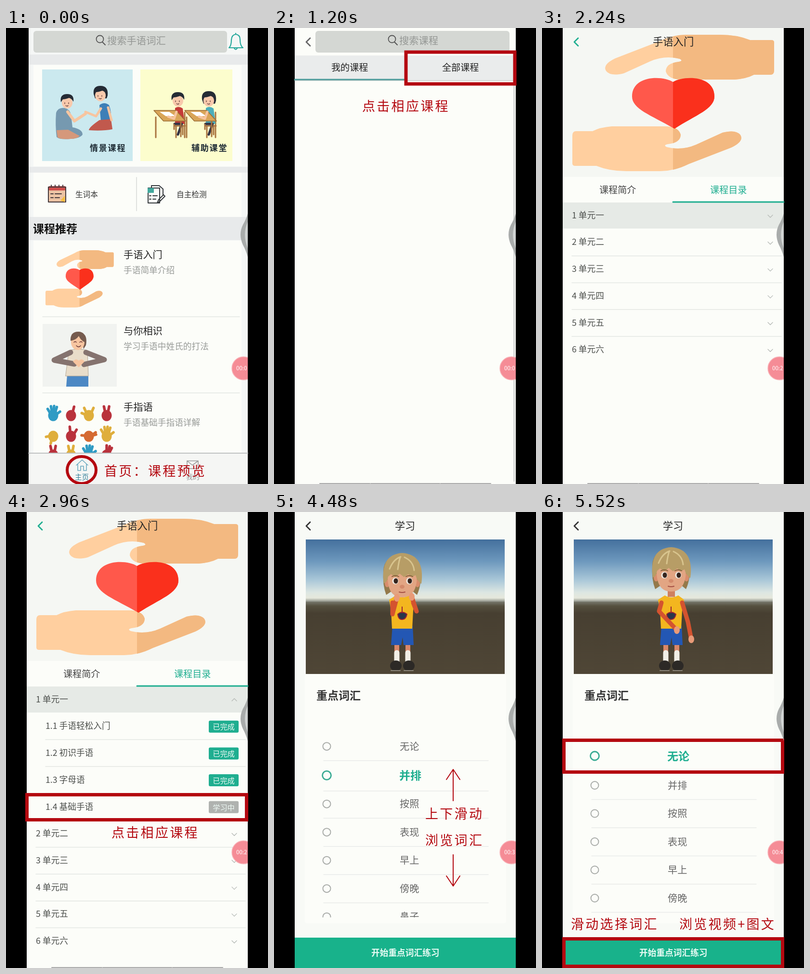
Write an HTML page with a canvas that moves like this. It is 544 px wide and 946 px high and loops after 5600 ms.

```html
<!DOCTYPE html>
<html lang="zh-CN">
<head>
<meta charset="utf-8">
<style>
html,body{margin:0;width:100%;height:100%;overflow:hidden;background:#000}
canvas{display:block}
</style>
</head>
<body>
<canvas id="stage" width="544" height="946"></canvas>
<script>
const c = document.getElementById('stage').getContext('2d');
const LOOP = 5600, STEP = 80;
const RED = '#b40810', TEAL = '#1fae90', PAGE = '#fcfdf9', NAVY = '#1f4257', SKIN = '#f7c5a0';

// ---- helpers ----
function rect(x, y, w, h, fill, r = 0) {
  c.fillStyle = fill;
  c.beginPath();
  c.roundRect(x, y, w, h, r);
  c.fill();
}
function path(d, fill, stroke, width = 2) {
  const p = new Path2D(d);
  if (fill) { c.fillStyle = fill; c.fill(p); }
  if (stroke) { c.strokeStyle = stroke; c.lineWidth = width; c.stroke(p); }
}
function oval(x, y, rx, ry, fill, stroke, width = 2) {
  c.beginPath();
  c.ellipse(x, y, rx, ry, 0, 0, 7);
  if (fill) { c.fillStyle = fill; c.fill(); }
  if (stroke) { c.strokeStyle = stroke; c.lineWidth = width; c.stroke(); }
}
function text(s, x, y, size, color, weight = 400, gap = 0, align = 'left') {
  c.font = `${weight} ${size}px "Noto Sans CJK SC","Noto Sans CJK",sans-serif`;
  c.letterSpacing = gap + 'px';
  c.textAlign = align;
  c.fillStyle = color;
  c.fillText(s, x, y);
}
const caption = (s, x, y) => text(s, x, y, 27, RED, 400, 3.3);
const hline = (x1, x2, y, color = '#e4e7e4', w = 1.5) => path(`M${x1} ${y}H${x2}`, null, color, w);
function box(x, y, w, h) {
  c.lineJoin = 'miter';
  c.strokeStyle = RED;
  c.lineWidth = 7;
  c.strokeRect(x, y, w, h);
  c.lineJoin = 'round';
}
function back(color) { path('M75 21L67 29L75 37', null, color, 2.8); }
function at(x, y, sx, sy, draw) {
  c.save();
  c.translate(x, y);
  c.scale(sx, sy);
  draw();
  c.restore();
}
function search(x, w, label, labelX) {
  rect(x, 6, w, 45, '#d4d7d3', 6);
  oval(labelX - 15, 23, 7.5, 7.5, null, '#555', 1.8);
  path(`M${labelX - 10} 29l6 6`, null, '#555', 2);
  text(label, labelX, 26, 20.3, '#949794');
}
const navMarks = () => [[95, 199], [201, 344], [346, 450]].forEach(([a, b]) => hline(a, b, 945, '#aaa', 2));

// ---- drawings ----
const palm = new Path2D('M482 30Q482 25 476 25H432Q405 14 370 14H300Q270 14 240 29L152 63Q125 76 133 89Q142 101 170 94L225 69Q255 56 286 64Q294 68 284 70Q257 73 257 90Q262 107 290 107H400Q425 105 440 97H474Q482 97 482 88Z');
const heart = new Path2D('M272 112C250 98 187 98 187 142C187 168 225 180 275 209C320 180 358 168 358 142C358 98 295 98 272 112Z');
function heartHands() {
  const layer = (skin, red) => {
    c.fillStyle = skin;
    c.fill(palm);
    at(545, 311, -1, -1, () => c.fill(palm));
    c.fillStyle = red;
    c.fill(heart);
  };
  layer('#ffcf9f', '#ff584b');
  c.save();
  c.beginPath();
  c.rect(272, 0, 300, 311);
  c.clip();
  layer('#f3b981', '#fa301c');
  c.restore();
}
function head(x, y, long) {
  if (long) path(`M${x - 14} ${y}q-2-17 14-17q17 0 15 20l-2 6h-24Z`, '#252b35');
  oval(x, y + 3, 11, 12, '#f8c9ac');
  path(`M${x - 13} ${y + 2}q-3-17 13-17q15 0 13 16q-4-7-9-8q-8 3-13 3Z`, '#252b35');
  path(`M${x - 5} ${y + 3}v2m8-2v2m-6 4q3 2 5 0`, null, '#533', 1.3);
}
function talkers() {
  path('M104 176q4-12 18-10q10 2 13 14l3 26q21 4 21 15q-5 8-25 9q-24 2-29-4q-3-25-1-50Z', '#7699b0');
  path('M105 212l24-1l24 13q-6 6-18 6q-20 2-28-3Z', '#d5987b');
  path('M128 174l14 19l23-15', null, SKIN, 6);
  head(127, 152);
  path('M194 160q10-8 20 0q6 16 3 30l-20 4Z', '#3e7fb7');
  path('M194 191l24-2l3 21q-20 4-49 2q0-6 22-21Z', '#c1594d');
  path('M197 167l-10 16l-22-9M212 165l7 26', null, SKIN, 5);
  head(196, 137, true);
}
function desk(x) {
  path(`M${x + 4} 185v42M${x + 42} 200v10M${x + 56} 190v35M${x + 60} 203v18`, null, '#a97440', 3);
  path(`M${x} 171h46l20 22h-46Z`, '#d9a558', '#9b6b34', 1.5);
  path(`M${x + 12} 174h20l13 9h-20Z`, '#fff');
}
function pupils() {
  [[307, '#c53b38'], [371, '#4baebb']].forEach(([x, shirt], i) => {
    path(`M${x + 43} 203h22M${x + 46} 203v24M${x + 64} 175v52`, null, '#a97440', 3);
    path(`M${x + 44} 166q8-5 16 1l4 32h-20Z`, shirt);
    path(`M${x + 43} 199h15l-8 22`, null, '#334', 5);
    desk(x);
    path(`M${x + 47} 174l-5 14l-12-4`, null, SKIN, 5);
    head(x + 50, 148, i);
  });
}
function heartGirl() {
  rect(76, 614, 154, 130, '#f1f3f0');
  path('M156 632q14 4 10 26l-5 8Z', '#765b4e');
  path('M127 720h44v24h-46Z', '#4c88c4');
  path('M131 669q20-6 38 0l2 53h-47Z', '#e9ddca', '#b3a592', 1);
  path('M134 673l-34 16l42 8M166 673l38 15l-42 10', null, '#85736f', 11);
  path('M139 692q6-8 12-2q7-6 12 2l-12 12Z', SKIN);
  oval(149, 652, 14, 16, SKIN);
  path('M134 649q-1-19 16-19q17 0 14 22q-8-3-13-13q-5 8-17 10Z', '#765b4e');
  path('M141 652q3-3 5 0m7 0q3-3 5 0m-12 7q5 5 9 0', null, '#633', 1.4);
}
function sign(x, y, color, angles) {
  oval(x, y + 5, 10.5, 11.5, color);
  angles.forEach(a => {
    const r = a * Math.PI / 180;
    path(`M${x + 5 * Math.cos(r)} ${y + 4}L${x + 15 * Math.cos(r)} ${y + 3 - 18 * Math.sin(r)}`, null, color, 5.5);
  });
}
function signGrid() {
  const open = [20, 60, 83, 108, 140], vee = [70, 112], B = '#2f9bc4', R = '#b9323c', Y = '#dfae3c', O = '#d56a32';
  [[[B, open], [R, [65]], [Y, [50, 130, 170]], [R, vee]],
   [[Y, [250, 190]], [R, [100, 40]], [O, [5, 20, 180]], [Y, open]],
   [[R, vee], [Y, vee], [B, open], [R, [45, 65, 90]]]].forEach((row, j) =>
    row.forEach(([color, angles], i) => sign(98 + i * 37, [799, 842, 881][j], color, angles)));
}
function fist() {
  path('M122 243L133 232M135 227L150 210L166 201M170 199Q188 190 214 192Q223 196 216 203L200 206L189 203L178 214M216 203Q225 212 220 222L208 226L192 221L176 216Q171 226 180 232L172 238L178 245L196 247M220 222Q219 236 212 242L196 236L180 232M212 242L210 255Q195 266 171 264M196 236L198 247M196 207L190 220M134 246L146 251M150 258L164 262L154 270', null, '#0a0a0a', 3);
}

// ---- pages ----
function home() {
  rect(47, 0, 455, 946, '#f5f7f6');
  [[55, 21], [288, 12], [392, 48]].forEach(([y, h]) => rect(47, y, 455, h, '#e8eaeb'));
  search(57, 402, '搜索手语词汇', 210);
  path('M463 41q5-4 5-17q1-10 9-11q9 1 9 11q0 13 6 17Zm11 1q3 5 6 0m-3-29v-2', null, '#28a99c', 2.2);
  [[77, 210], [300, 92], [441, 441]].forEach(([y, h]) => rect(57, y, 432, h, PAGE));
  rect(75, 86, 188, 190, '#cbe9ef');
  rect(279, 86, 191, 190, '#fcfdcd');
  talkers();
  pupils();
  text('情景课程', 174, 249, 17, '#1d2a33', 700, 1.8);
  text('辅助课堂', 385, 249, 17, '#1d2a33', 700, 1.8);

  path('M271 310V379', null, '#dfe1df');
  rect(88, 328, 36, 33, '#ecc3a4', 3);
  rect(88, 328, 36, 9, '#cf4e4b', 3);
  path('M88 330h36v31h-36Zm6-4v4m8-4v4m8-4v4m8-4v4M93 344h5m4 0h13M93 352h5m4 0h9', null, '#463a3d', 2);
  path('M113 358l9-10v13Z', '#f5bd3e');
  text('生词本', 144, 345, 15.6, '#333');
  path('M295 332h24v31h-24ZM302 332v-5h16l8 7v12', null, '#35393d', 2);
  rect(294, 332, 13, 10, '#42a99d');
  path('M298 348h3m4 0h9m-16 7h3m4 0h6M314 363l3-7l10-10l3 3l-11 11Z', null, '#35393d', 2);
  text('自主检测', 354, 345, 15.7, '#333');
  text('课程推荐', 56, 416, 23, '#111', 700);

  at(60.7, 455.1, .338, .42, heartHands);
  heartGirl();
  signGrid();
  [['手语入门', '手语简单介绍'], ['与你相识', '学习手语中姓氏的打法'], ['手指语', '手语基础手指语详解']].forEach(([a, b], i) => {
    const y = 470 + i * 158;
    text(a, 244, y, 20.2, '#222');
    text(b, 244, y + 32, 17.7, '#989b98');
    if (i < 2) hline(76, 485, y + 129);
  });

  rect(47, 882, 455, 64, '#f5f6f4');
  hline(47, 502, 882, '#bfc1c2', 2);
  path('M146 907l12-11l12 11m-21-2v13h6v-9h6v9h6v-13', null, '#6aa9c0', 1.6);
  text('主页', 143, 931, 14.5, '#35809a');
  path('M376 898h23v16h-23Zl11 9l12-9', null, '#9a9c9c', 1.6);
  text('我的', 374, 931, 14, '#999');
  oval(157, 917, 30, 28, null, RED, 6);
  caption('首页：课程预览', 204, 919);
}

function courses(t) {
  const all = t >= 1440;
  rect(43, 0, 459, 946, PAGE);
  back('#666');
  search(86, 403, '搜索课程', 260);
  rect(43, 57, 459, 51, '#eaecec');
  text('我的课程', 119, 82, 19.1, '#222');
  text('全部课程', 349, 82, 19.1, all ? TEAL : '#222');
  hline(43, 502, 109, '#c9cccc', 1.5);
  hline(all ? 272 : 43, all ? 502 : 272, 107, all ? TEAL : '#4d9c9b', 3);
  if (all) {
    [...'初进高'].forEach((level, i) => at(0, i * 227.3, 1, 1, () => {
      hline(56, 489, 126, '#54808c', 4);
      hline(56, 489, 335, '#54808c', 4);
      path('M58.5 134.5H486.5V326.5H58.5Z', '#fafaef', NAVY, 3);
      fist();
      path('M259.5 196H441.5V264H259.5ZM318 197L309 265', null, i === 1 ? '#557080' : NAVY, 2.5);
      text(level, 274, 233, 30, NAVY, 500);
      text('阶课程', 322, 233, 30, NAVY, 500, 8);
    }));
    rect(43, 831, 459, 115, '#e7eaea');
    hline(43, 502, 831, '#d3d6d6');
    if (t >= 1520) box(53, 128.5, 437.5, 202);
  } else {
    path('M498.5 110V940', null, '#d5d7d6', 3);
    if (t >= 880) box(274, 50, 226, 66);
  }
  navMarks();
  caption('点击相应课程', 183, 162);
}

function detail(t) {
  const open = t >= 2640, ink = '#4c4f4c';
  rect(43, 0, 459, 946, PAGE);
  rect(43, 0, 459, 309, '#f5f7f3');
  heartHands();
  back(TEAL);
  text('手语入门', 230, 28, 21.3, '#222');
  text('课程简介', 119, 336, 19.1, '#444');
  text('课程目录', 349, 336, 19.1, TEAL);
  rect(43, 362, 459, 54, '#e6eae6');
  hline(272, 502, 361, TEAL, 3);
  let y = 388;
  [...'一二三四五六'].forEach((n, i) => {
    text(`${i + 1} 单元${n}`, 62, y, 17.7, ink);
    const dir = open && !i ? -1 : 1;
    path(`M469 ${y + 2 - 2 * dir}l5 ${5 * dir}l5 ${-5 * dir}`, null, '#b5b9b5', 1.3);
    if (i && i < 5) hline(62, 497, y + 29);
    if (!i && open) ['手语轻松入门', '初识手语', '字母语', '基础手语'].forEach((name, k) => {
      y += 55.7;
      text(`1.${k + 1} ${name}`, 82, y, 17.7, ink);
      rect(421, y - 11, 62, 25, k < 3 ? TEAL : '#afb2af', 3);
      text(k < 3 ? '已完成' : '学习中', 452, y + 2, 15.2, '#eefaf5', 400, 0, 'center');
      hline(82, 497, y + 28.5);
    });
    y += 55.7;
  });
  navMarks();
  if (open) {
    box(43.5, 586.5, 456, 52);
    caption('点击相应课程', 219, 665);
  }
}

// time, horizon, centre x, head y, then elbow and hand of each arm
const POSES = [
  [3840, 207, 264, 119, 238, 216, 257, 222, 290, 216, 272, 222],
  [4320, 186, 266, 128, 246, 212, 255, 178, 296, 206, 286, 176],
  [4640, 186, 266, 128, 246, 212, 255, 178, 296, 206, 286, 176],
  [5040, 186, 268, 116, 243, 206, 280, 245, 303, 228, 310, 264]
];
function poseAt(t) {
  const next = POSES.findIndex(p => p[0] > t);
  if (next < 0) return POSES[3];
  if (!next) return POSES[0];
  const a = POSES[next - 1], b = POSES[next], u = (t - a[0]) / (b[0] - a[0]), k = u * u * (3 - 2 * u);
  return a.map((v, i) => v + (b[i] - v) * k);
}
function shade(top, bottom, stops) {
  const g = c.createLinearGradient(0, top, 0, bottom);
  stops.forEach(s => g.addColorStop(...s));
  rect(66, top, 413, bottom - top, g);
}
function video(t) {
  const [, horizon, x, y, ...arm] = poseAt(t);
  c.save();
  c.beginPath();
  c.rect(66, 57, 413, 279);
  c.clip();
  shade(57, horizon, [[0, '#44709d'], [.35, '#6d98bd'], [.65, '#a9c7d8'], [.85, '#dce6e2'], [.94, '#e6e8dc'], [1, '#90948a']]);
  shade(horizon, 336, [[0, '#77786c'], [.06, '#55503f'], [.16, '#473f31'], [1, '#4f4636']]);

  path(`M${x - 11} 270v44m23-44v44`, null, '#d8876a', 10);
  path(`M${x - 11} 292v20m23-20v20`, null, '#f1eee6', 11);
  [-13, 14].forEach(d => {
    oval(x + d, 319, 12, 11, '#2c2926');
    hline(x + d - 10, x + d + 9, 329, '#8d877b', 2);
  });
  path(`M${x - 20} 236h42l2 40h-21l-2-16l-3 16h-21Z`, '#2357b4');
  path(`M${x - 13} 173q13 8 28 0l12 9l-4 22l-2 38h-42l-2-38l-4-22Z`, '#f3b61f');
  path(`M${x - 9} 212q9-8 19 0q-2 11-10 11q-8 0-9-11Zm9-3v-12`, '#29374b', '#923', 2);
  const [lx, ly, lhx, lhy, rx, ry, rhx, rhy] = arm;
  rect(x - 7, 160, 15, 16, '#cf805f');
  const limbs = () => {
    path(`M${x - 20} 188L${lx} ${ly}L${lhx} ${lhy}M${x + 23} 188L${rx} ${ry}L${rhx} ${rhy}`, null, '#d4532f', 9);
    oval(lhx, lhy, 6, 8, '#e99a77');
    oval(rhx, rhy, 6, 8, '#e99a77');
  };
  if (lhy > 200) limbs();

  oval(x, y - 6, 39, 36, '#94794b');
  path(`M${x - 39} ${y - 6}q-2 30 6 50l12-8h42l10 8q10-22 7-50Z`, '#94794b');
  oval(x - 31, y + 20, 5, 8, '#d98d6c');
  oval(x + 32, y + 20, 5, 8, '#d98d6c');
  path(`M${x - 30} ${y}q-2 49 30 49q32 0 31-49q-31-18-61 0Z`, '#e2a583');
  path(`M${x - 38} ${y + 20}q-8-60 38-63q48 3 40 64q-9-6-12-18l-8 4l-7-6l-9 6l-9-7l-9 7l-9-6l-6 5q-2 12-9 14Z`, '#b79d66');
  path(`M${x - 26} ${y - 10}q8-20 23-25M${x - 9} ${y - 9}q2-16 5-25M${x + 25} ${y - 7}q-2-19-20-27`, null, '#d8c48e', 3);
  [-14, 15].forEach(d => {
    oval(x + d, y + 15, 6.5, 7, '#eeeae2');
    oval(x + d + 1, y + 15, 4.5, 5.5, '#35241d');
    path(`M${x + d - 7} ${y + 6}q7-4 14 0`, null, '#87623b', 2);
  });
  oval(x, y + 27, 5, 4, '#d38a6b');
  path(`M${x - 6} ${y + 38}q6 2 12 0`, null, '#a44e43', 2);
  if (lhy <= 200) limbs();
  c.restore();
}

const WORDS = ['无论', '并排', '按照', '表现', '早上', '傍晚', '鼻子', '脖子'];
const unit = v => Math.min(1, Math.max(0, v));
const easeOut = u => 1 - Math.pow(1 - unit(u), 1.56);
function study(t) {
  rect(43, 0, 459, 946, '#f8faf6');
  rect(64, 337, 418, 516, PAGE, 4);
  back('#333');
  text('学习', 251, 28, 21, '#222');
  video(t);
  text('重点词汇', 88, 380, 23, '#333', 700);

  const pos = 2 - easeOut((t - 4000) / 240) - easeOut((t - 4320) / 320);
  const chosen = t < 4240 ? 2 : t < 4640 ? 1 : 0;
  c.save();
  c.beginPath();
  c.rect(64, 412, 418, 429);
  c.clip();
  WORDS.forEach((word, i) => {
    const d = i - pos, y = 506 + 58.5 * d + 2.5 * unit(d), on = i === chosen;
    oval(109.5, y, on ? 9 : 8, on ? 9 : 8, null, on ? '#3aab94' : '#a9aca9', on ? 2.8 : 2);
    text(word, on ? 260 : 261, y, on ? 23 : 20.2, on ? TEAL : '#666', on ? 700 : 400);
    hline(103, 445, y + (on ? 32.5 : 29.5), '#e9ebe9');
  });
  c.restore();

  rect(43, 883, 459, 63, '#18b28b');
  text('开始重点词汇练习', 202, 914, 17.7, '#e8fbf4', 700);
  if (t < 4720) {
    path('M372 599V535M358 555L372 534L386 555M372 711V775M358 755L372 776L386 755', null, RED, 2);
    caption('上下滑动', 314, 626);
    caption('浏览词汇', 314, 681);
  } else {
    box(45.5, 473.5, 454, 66);
    box(45.5, 885.5, 454, 57);
    caption('滑动选择词汇', 60, 855);
    caption('浏览视频+图文', 285, 855);
  }
}

function overlay(t) {
  path('M502 385Q498 398 492 408Q482 428 492 450Q498 461 502 475Z', '#a9acab');
  path('M502 402Q490 428 502 457Z', '#d0d3d2');
  c.save();
  c.beginPath();
  c.rect(43, 0, 459, 946);
  c.clip();
  oval(493, 706, 24, 24, '#f58c96', '#f9b5ba', 1.5);
  const digit = t < 2080 ? 0 : t < 3280 ? 2 : t < 4800 ? 3 : 4;
  text('00:' + digit, 478, 706, 11.5, '#fff');
  c.restore();
}

function frame(now) {
  const t = Math.floor(now % LOOP / STEP) * STEP;
  c.textBaseline = 'middle';
  c.lineCap = c.lineJoin = 'round';
  rect(0, 0, 544, 946, '#000');
  const page = t < 640 ? home : t < 2080 ? courses : t < 3280 ? detail : study;
  page(t);
  overlay(t);
  requestAnimationFrame(frame);
}
frame(performance.now());
</script>
</body>
</html>
```
